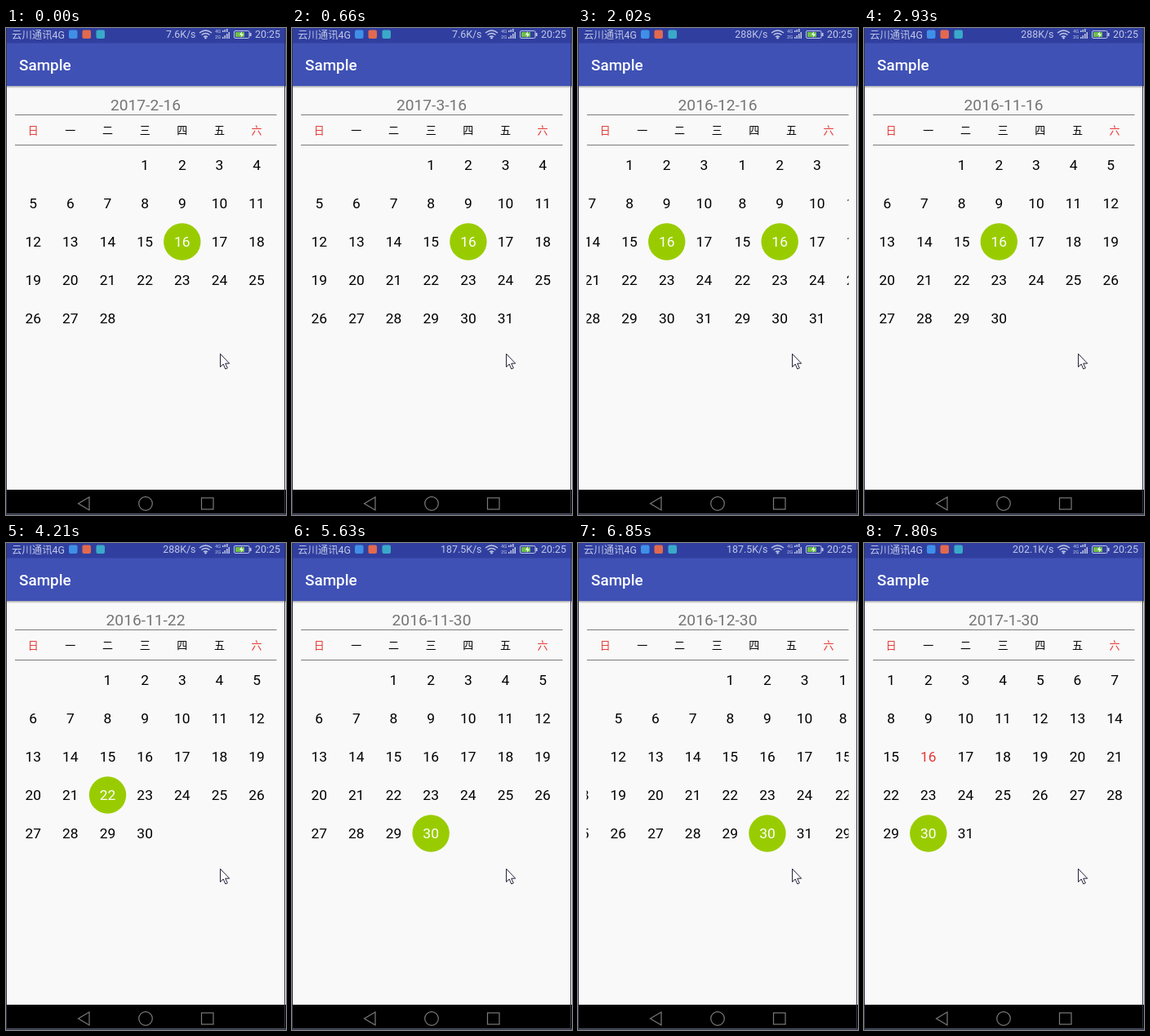
An HTML page for the animation above (8000 ms loop, 343 by 597 pixels).

```html
<!DOCTYPE html>
<html lang="zh">
<head>
<meta charset="utf-8">
<title>Sample</title>
<style>
  html, body { margin: 0; width: 100%; height: 100%; overflow: hidden; background: #fafafa; }
  svg { display: block; width: 343px; height: 597px; font-family: Roboto, "Noto Sans CJK SC", "Noto Sans CJK", sans-serif; }
  .mid { text-anchor: middle; }
  .status { font-size: 12.4px; fill: #c1c7e6; }
  .week { font-size: 13px; font-weight: 500; }
  .days { font-size: 17.4px; }
  .red { fill: #e53935; }
  .line { fill: none; stroke: #7b7b7b; stroke-width: 1.2; }
</style>
</head>
<body>
<svg viewBox="0 0 343 597">
  <defs>
    <clipPath id="view"><rect x="10.5" y="145" width="321" height="240"/></clipPath>
    <linearGradient id="shade" x2="0" y2="1">
      <stop stop-color="#a5a5a8"/><stop offset="1" stop-color="#fafafa"/>
    </linearGradient>
  </defs>
  <rect width="343" height="597" fill="#f9f9f9"/>
  <rect width="343" height="19" fill="#303f9f"/>
  <rect y="18.5" width="343" height="52.5" fill="#3f51b5"/>
  <rect y="71" width="343" height="3" fill="url(#shade)"/>

  <g class="status">
    <text x="7" y="12.5">云川通讯4G</text>
    <rect x="77" y="2.5" width="10.5" height="10.5" rx="2" fill="#3f8fe8"/>
    <rect x="93.500" y="2.5" width="10.5" height="10.5" rx="2" fill="#e2694f"/>
    <rect x="110.500" y="2.5" width="10.5" height="10.5" rx="2" fill="#3aa9c9"/>
    <text id="speed" x="232.5" y="12.3" text-anchor="end"></text>
    <text x="305" y="12.3">20:25</text>
    <g fill="none" stroke="#c1c7e6" stroke-width="1.4">
      <path d="M237 6q7.500-6 15 0M239.500 8.500q5-4 10 0M242 11q2.500-2 5 0"/>
      <rect x="279.500" y="3.500" width="18.500" height="9" rx="1.500" stroke-width="1"/>
    </g>
    <circle cx="244.500" cy="12.300" r="1.200"/>
    <path d="M298.500 6h2v4h-2z"/>
    <rect x="281" y="5" width="11" height="6" fill="#6fbf4b"/>
    <path d="M289 4l-3 4.500h2.500l-1 3.500 3.500-4.500h-2.500z" fill="#fff"/>
    <g font-size="6"><text x="256" y="5.500">4G</text><text x="256" y="12.500">2G</text></g>
    <path d="M265 5V3h1.500v2zM267.500 5V2H269v3zM270 5V1h1.500v4zM265 13v-2h1.500v2zM267.500 13v-4H269v4zM270 13V7h1.500v6zM272.500 13V5h1.500v8z"/>
  </g>

  <text x="16" y="52.300" font-size="18.9" font-weight="500" fill="#fff">Sample</text>
  <text id="date" class="mid" x="171" y="101.300" font-size="19.2" fill="#757575"></text>
  <path class="line" d="M11 106.500H331.500M11 143.500H331.500"/>
  <g id="week" class="week mid"></g>
  <g clip-path="url(#view)"><g id="pages" class="days mid"></g></g>

  <path d="M262.500 399.500v16l3.700-3.500 2.600 6 2.500-1.100-2.600-5.700h5z" fill="#fff" stroke="#23233a"/>
  <rect y="566" width="343" height="29.500" fill="#000"/>
  <rect y="595.500" width="343" height="1.500" fill="#30374f"/>
  <g class="line">
    <path d="M88.500 583L102 575v16z"/>
    <circle cx="171" cy="583" r="8.300"/>
    <rect x="239.500" y="576" width="14.500" height="14"/>
  </g>
  <path d="M.5 0V597M341.500 0V597" stroke="#33364a"/>
</svg>
<script>
const LOOP = 8000, PAGE = 321;
const $ = id => document.getElementById(id);

// Screen refresh times; the picture holds between them.
const ticks = [0, 120, 240, 390, 510, 660, 780, 900, 1050, 1170, 1300, 1450, 1570, 1720, 1870, 2020,
  2140, 2270, 2390, 2540, 2690, 2810, 2930, 3080, 3230, 3380, 3500, 4210, 4920, 5630, 6210, 6330,
  6460, 6600, 6720, 6850, 6990, 7140, 7260, 7410, 7530, 7680, 7800];

// Swipes as [start, direction in months].
const swipes = [[60, 1], [670, -1], [1080, -1], [1833, -1], [2450, -1], [6033, 1], [6800, 1]];
const speeds = [[0, "7.6K/s"], [1870, "288K/s"], [4920, "187.5K/s"], [7800, "202.1K/s"]];
const picks = [[0, 16], [4210, 22], [5630, 30]];

const at = (list, t) => list.filter(e => e[0] <= t).pop()[1];
const colX = i => 33.2 + 45.65 * i;
const rowY = i => 168 + 47 * i;
const month = k => new Date(2017, 1 + k, 1);

function progress(t, start) {
  const u = Math.min(1, Math.max(0, (t - start) / 700));
  return 1 - (1 - u ** 1.5) ** 5;
}

function page(k, picked, x) {
  const first = month(k), y = first.getFullYear(), m = first.getMonth();
  const count = new Date(y, m + 1, 0).getDate();
  let out = `<g transform="translate(${x})">`;
  for (let d = 1; d <= count; d++) {
    const cell = first.getDay() + d - 1;
    const cx = colX(cell % 7), cy = rowY(Math.floor(cell / 7));
    const today = y === 2017 && m === 0 && d === 16;
    let fill = today ? "#e53935" : "#000";
    if (d === picked) {
      fill = "#fff";
      out += `<circle cx="${cx}" cy="${cy - 6 + 6}" r="22.7" fill="#9c0"/>`;
    }
    out += `<text x="${cx}" y="${cy + 6}" fill="${fill}">${d}</text>`;
  }
  return out + "</g>";
}

function draw(t) {
  let pos = 0, current = 0;
  for (const [start, dir] of swipes) {
    const p = progress(t, start);
    pos += dir * p;
    if (p > 0.3) current += dir;
  }
  const day = at(picks, t), shown = month(current), left = Math.floor(pos);
  $("speed").textContent = at(speeds, t);
  $("date").textContent = `${shown.getFullYear()}-${shown.getMonth() + 1}-${day}`;
  $("pages").innerHTML = [left, left + 1].map(k => page(k, day, (k - pos) * PAGE)).join("");
}

$("week").innerHTML = [..."日一二三四五六"].map((c, i) =>
  `<text x="${colX(i)}" y="130"${i % 6 ? "" : ' class="red"'}>${c}</text>`).join("");

let last = -1;
function frame() {
  const now = performance.now() % LOOP;
  const t = ticks.filter(k => k <= now).pop();
  if (t !== last) draw(last = t);
  requestAnimationFrame(frame);
}
frame();
</script>
</body>
</html>
```
